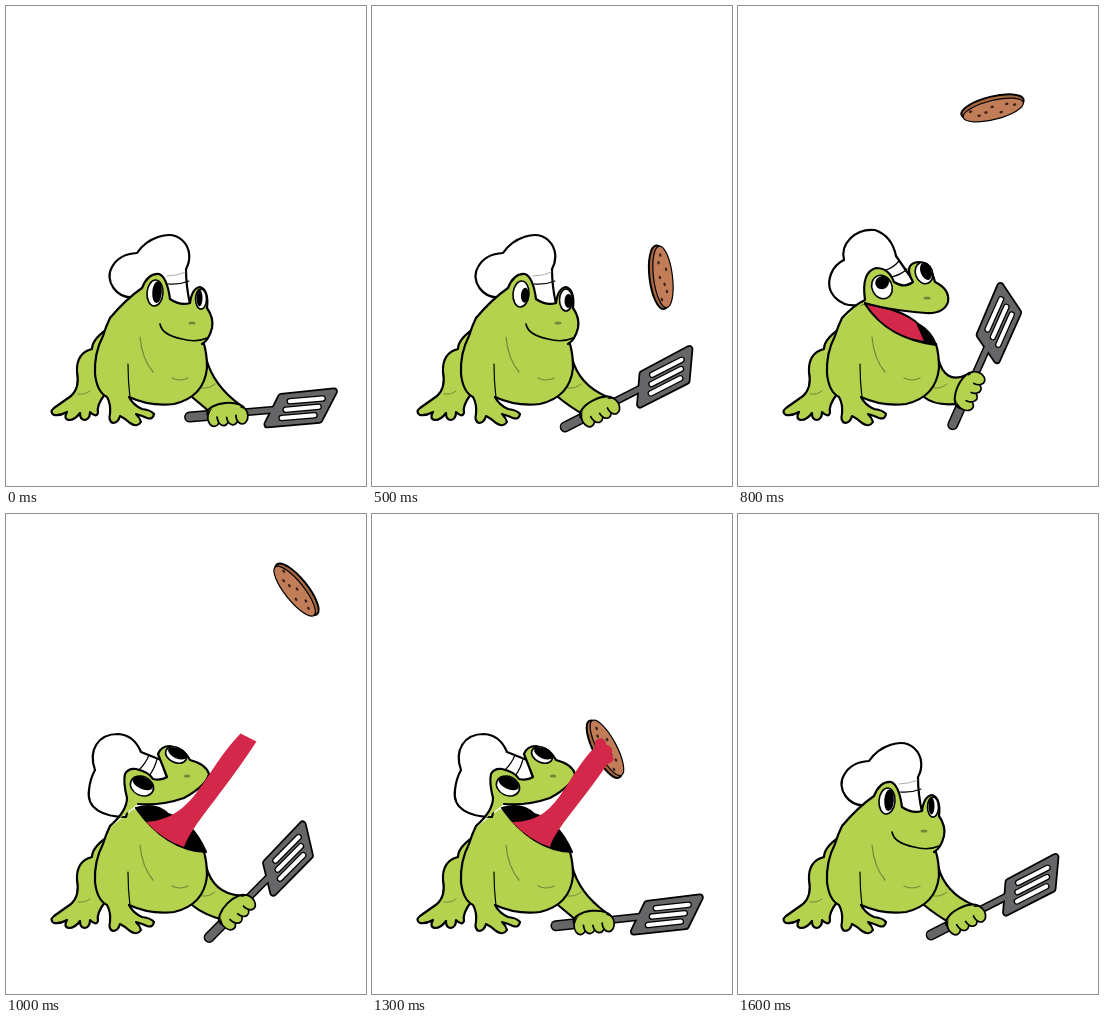
An HTML page for the animation above (1.7 s loop, 360 by 480 pixels).

```html
<!DOCTYPE html>
<html lang="en">
<head>
<meta charset="utf-8">
<title>Frog chef</title>
<style>
html, body { margin: 0; width: 100%; height: 100%; overflow: hidden; background: #fff }
svg { display: block; width: 100%; height: 100% }
</style>
</head>
<body>
<svg id="stage" viewBox="0 0 360 480" stroke-linejoin="round" stroke-linecap="round"></svg>
<script>
const GREEN = '#b4d24e', SHADE = '#75883a', RED = '#d3284a', STEEL = '#666669', INK = '#000';
const stage = document.getElementById('stage');
const STEP = 100, STEPS = 17;

const path = (d, fill = GREEN, stroke = INK, width = 2.2) =>
  `<path d="${d}" fill="${fill}" stroke="${stroke}" stroke-width="${width}"/>`;
const line = (d, stroke = INK, width = 1.2) => path(d, 'none', stroke, width);
const oval = (x, y, rx, ry, fill, stroke = 'none', width = 1.6) =>
  `<ellipse cx="${x}" cy="${y}" rx="${rx}" ry="${ry}" fill="${fill}" stroke="${stroke}" stroke-width="${width}"/>`;
const place = (x, y, angle, content) =>
  `<g transform="translate(${x} ${y}) rotate(${angle})">${content}</g>`;
const eye = (x, y, rx, ry, angle, px, py, prx, pry) => place(x, y, angle,
  oval(0, 0, rx, ry, '#fff', INK) + oval(px, py, prx, pry, INK));
const repeat = (count, draw) => Array.from({ length: count }, (_, i) => draw(i)).join('');

const mix = (a, b, t) => a + (b - a) * t;

// Eased value at time t between [time, value] keys
function keyed(keys, t) {
  const i = keys.findIndex(([time]) => time >= t);
  if (i < 1) return keys[i < 0 ? keys.length - 1 : 0][1];
  const [[t0, v0], [t1, v1]] = [keys[i - 1], keys[i]];
  return mix(v0, v1, (1 - Math.cos(Math.PI * (t - t0) / (t1 - t0))) / 2);
}

const hindLeg = path('M106 320Q86 332 86 343Q70 347 71 366Q74 382 65 390L48 402Q43 406 48 409'
  + 'Q54 410 61 406Q57 413 63 414Q69 414 74 407Q74 414 79 414Q84 413 84 406Q90 412 92 407Q90 400 99 388')
  + line('M72 388Q79 389 84 385', SHADE, 1);
const body = path('M104 312Q100 320 97 330Q88 347 89 368Q91 386 101 391Q105 398 104 408Q102 415 107 417'
  + 'Q112 417 114 410Q120 413 124 417Q131 422 135 416Q134 412 130 408Q137 410 141 412Q147 414 148 408'
  + 'Q145 404 136 403Q127 399 123 391Q145 401 168 398Q198 391 201 362Q201 348 198 338')
  + line('M122 358Q122 375 124 392') + line('M134 331Q136 353 147 366', SHADE)
  + line('M166 372Q174 376 182 372', SHADE)
  + path('M106 313L128 296L148 314L195 336Z', GREEN, GREEN, 2);

const hats = {
  closed: path('M130 291C110 294 98 274 106 261Q113 248 131 247C141 232 164 223 176 234C186 243 184 256 180 263Q180 280 184 298L150 300Z', '#fff')
    + line('M162 278Q173 279 183 275') + line('M161 270Q170 270 180 266', '#888', .7),
  half: path('M122 299C102 302 86 287 93 268Q97 258 106 254C102 238 117 222 137 224Q154 230 158 250L176 276L140 290Z', '#fff')
    + line('M148 264Q155 262 161 255') + line('M153 271Q163 269 169 263'),
  open: path('M120 303C98 303 80 295 83 276Q84 265 89 256C82 236 92 220 112 220Q128 221 135 238L155 246L162 266L125 280Z', '#fff')
    + line('M133 256Q140 249 143 241') + line('M143 262Q149 254 151 245')
};

const mouths = {
  closed: '',
  half: path('M127 298Q165 303 180 318Q193 325 198 339Q150 333 127 298Z', INK)
    + path('M129 299Q163 305 178 317L186 335Q149 329 129 299Z', RED, 'none'),
  open: path('M130 294Q150 288 162 300Q186 306 200 338Q160 336 130 294Z', INK)
};

const closedEyes = {
  idle: eye(149, 287, 8, 13, 4, 2, -1, 4.8, 11) + eye(195, 293, 5.5, 10, 0, -1.5, -1, 3, 8.5),
  low: eye(149, 288, 8, 13, 4, 4, 4, 4, 7.5) + eye(194, 294, 6.5, 11, 0, 0, 4, 4.5, 7),
  right: eye(149, 288, 8, 13, 4, 4, 1, 4, 7.5) + eye(194, 294, 6.5, 11, 0, 2.5, 1, 4, 7)
};

const heads = {
  closed: look => line('M131 299L194 334', GREEN, 7)
    + path('M104 312Q120 293 136 282Q142 267 153 268Q161 271 164 293Q174 300 184 297Q186 282 194 281Q203 284 201 302'
      + 'Q208 312 206 322Q203 334 196 338')
    + closedEyes[look] + oval(186, 317, 3.5, 1.6, SHADE) + line('M154 318Q156 329 176 333Q190 337 201 332', INK, 1.6),
  half: () => path('M104 312Q116 299 127 294Q123 266 138 262Q151 262 156 276Q167 283 175 276Q165 258 180 256Q192 256 197 276'
      + 'Q212 283 210 296Q206 308 188 307Q150 304 127 297')
    + eye(144, 281, 10, 12, -25, 2, -4, 7, 6.5) + eye(186, 267, 8.5, 11, -20, 2.5, -1, 5.5, 9)
    + oval(189, 292, 3.5, 1.6, SHADE),
  open: () => path('M104 312Q121 297 121 284Q117 268 119 260Q122 254 130 255Q143 258 147 265Q155 267 161 263L152 240Q155 232 164 232'
      + 'Q178 234 184 246Q200 250 203 260Q200 272 178 284Q155 292 132 290')
    + eye(136, 272, 12, 9.5, 25, -.5, -3, 11, 6) + eye(170, 241, 11, 7.5, 25, .5, -2, 10, 5)
    + oval(181, 262, 3.2, 1.6, SHADE)
};

function headAt(k) {
  if (k < 8 || k > 14) return 'closed';
  return k === 8 || k === 14 ? 'half' : 'open';
}
const lookAt = k => k > 14 || k === 0 ? 'idle' : k < 4 ? 'low' : 'right';

// Upward tilt of the spatula in degrees
const tiltAt = k => keyed([[0, 5], [3, -33], [5, 27], [8, 66], [13, 6], [16, 27]], k);

function gripAt(tilt) {
  const a = tilt * Math.PI / 180, x = 219 + 11 * Math.sin(1.5 * a), y = 408 - .0053 * Math.max(tilt, 0) ** 2;
  const at = (u, v) => [x + u * Math.cos(a) + v * Math.sin(a), y - u * Math.sin(a) + v * Math.cos(a)];
  return { x, y, at };
}

const arm = ({ at }) => path(`M200 352Q207 379 ${at(14, -8)}L${at(-14, -1)}Q198 401 186 391`)
  + line('M196 382Q203 383 209 378', SHADE, 1);

const blade = 'M56 -12L109 -13L92 14L40 14Z';
const slots = repeat(3, i => {
  const y = 8 * i - 7, d = `M${60 - .6 * y} ${y}H${93 - .6 * y}`;
  return line(d, INK, 6.5) + line(d, '#fff', 4);
});
const spatula = line('M-37 0H48', INK, 8) + line('M-37 0H-4', INK, 11)
  + path(blade, INK, INK, 8) + path(blade, STEEL, STEEL, 4.5)
  + line('M-37 0H48', STEEL, 5) + line('M-37 0H-4', STEEL, 8) + slots;
const hand = oval(0, -2, 19, 9, GREEN, INK, 2)
  + repeat(4, i => oval(9.4 * i - 13, 3, 6, 8.5, GREEN, INK, 1.7)) + oval(0, -3, 16, 6, GREEN);

const patty = oval(0, 2, 32, 10.5, '#a5683f', INK, 2) + oval(0, -1, 31, 9.5, '#c07d58', INK, 1.2)
  + repeat(7, i => oval(7.4 * i - 22, 4 * Math.sin(2.4 * i) - 1, 1.8, 1.2, '#3d2118'));

// Toss: a parabola with a quickening spin
function flyingPatty(k) {
  const u = (k - 5) / 3;
  return place(290 - 87 * u + 52 * u * u, 271 - 245 * u + 77 * u * u, 83 + 74 * u + 9 * u * u, patty);
}

const reachAt = k => keyed([[9, 0], [11, 1], [12, .93], [13, .43]], k);

function tongue(k) {
  const reach = reachAt(k), caught = k > 11;
  const along = (f, dx, dy) => [mix(160, mix(168, 317, reach), f) + dx, mix(318, mix(322, 125, reach), f) + dy];
  const [x, y] = along(1, 0, 0), w = 1.5 + 13 * (1 - reach);
  const shape = path(`M140 308C${along(.3, 5, 15)} ${along(.55, -9, -7)} ${along(1, -w, -w / 2)}`
    + `L${along(1, w, w / 2)}C${along(.55, 9, 17)} ${along(.3, 2, 20)} 178 333Q157 326 140 308Z`, RED, 'none');
  const splat = path('M-14 0Q-13 -8 -5 -5Q2 -11 6 -5Q15 -6 13 1Q14 8 5 6Q-2 10 -6 5Q-13 7 -14 0Z', RED, 'none');
  return (caught ? place(x + 2, y - 3, 62, patty) : '') + shape + (caught ? place(x, y, 62, splat) : '');
}

function draw(k) {
  const tilt = tiltAt(k), grip = gripAt(tilt), head = headAt(k);
  const load = k === 2 || k === 3 ? place(76, -7, -15, patty) : '';
  stage.innerHTML = hindLeg + arm(grip) + body + hats[head] + mouths[head] + heads[head](lookAt(k))
    + place(grip.x, grip.y, -tilt, spatula + load + hand)
    + (k > 3 && k < 12 ? flyingPatty(k) : '') + (k > 9 && k < 14 ? tongue(k) : '');
}

let shown = -1;
function tick() {
  const k = Math.floor(performance.now() / STEP) % STEPS;
  if (k !== shown) draw(shown = k);
  requestAnimationFrame(tick);
}
tick();
</script>
</body>
</html>
```
